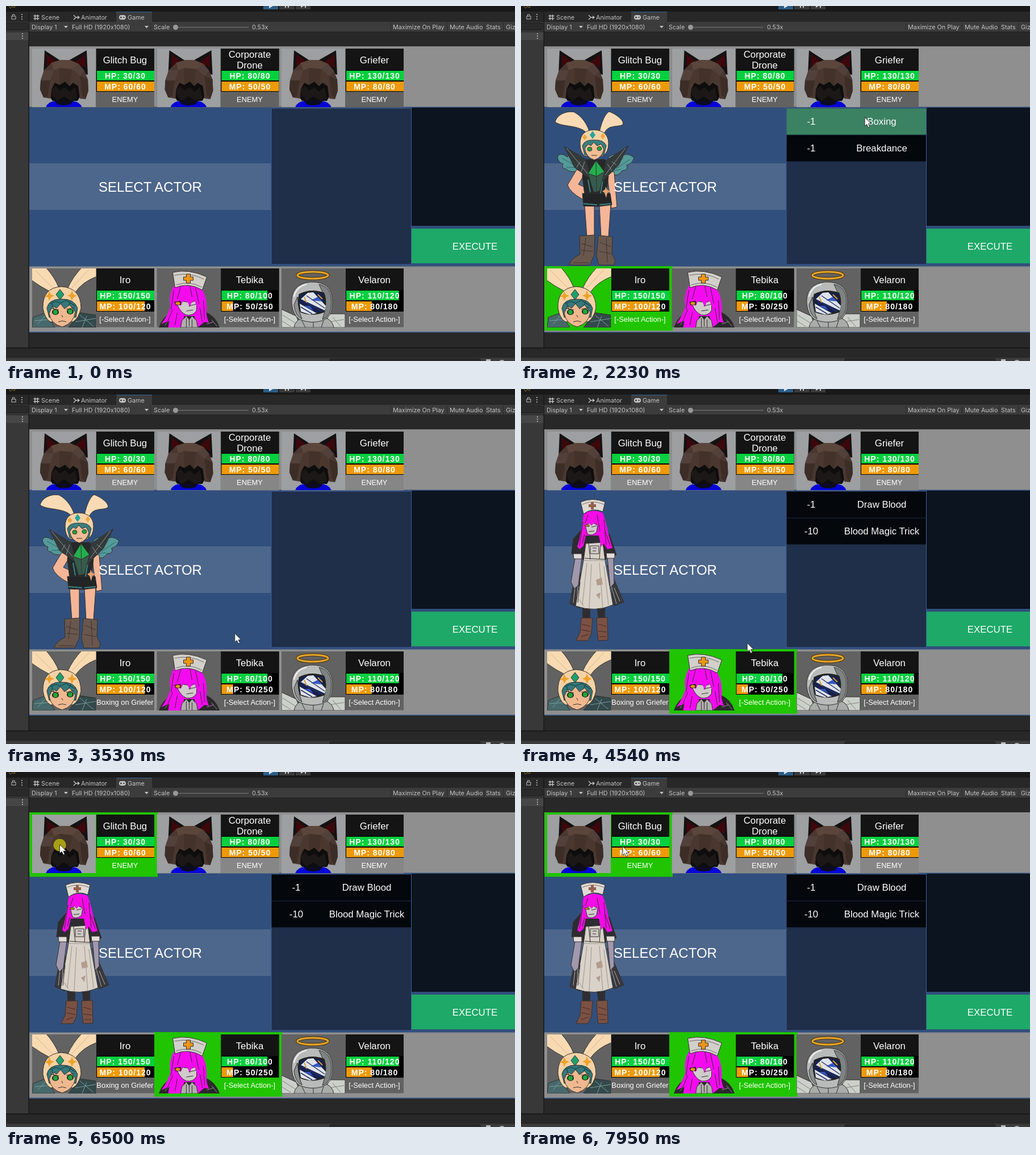
These frames come from a looping animation (896x625 px, 8000 ms). An HTML page:

```html
<!DOCTYPE html>
<html>
<head>
<meta charset="utf-8">
<style>
html, body { margin: 0; width: 100%; height: 100%; overflow: hidden; background: #282828; }
svg { display: block; }
text { font-family: "Liberation Sans", Arial, sans-serif; fill: #fff; text-anchor: middle; dominant-baseline: central; }
.ui { font-family: Inter, sans-serif; font-size: 10.8px; fill: #c2c2c2; text-anchor: start; }
.bar { font-weight: bold; font-size: 14px; letter-spacing: 1px; }
.ink { stroke: #33302f; stroke-width: 1; stroke-linejoin: round; }
</style>
</head>
<body>
<svg id="stage" width="896" height="625" viewBox="0 0 896 625"></svg>
<script>
const rect = (x, y, w, h, fill, more = '') => `<rect x="${x}" y="${y}" width="${w}" height="${h}" fill="${fill}" ${more}/>`;
const path = (d, fill, more = '') => `<path d="${d}" fill="${fill}" ${more}/>`;
const ink = (d, fill) => path(d, fill, 'class="ink"');
const line = (d, color = '#33302f', w = 1) => path(d, 'none', `stroke="${color}" stroke-width="${w}"`);
const oval = (x, y, rx, ry, fill, more = '') => `<ellipse cx="${x}" cy="${y}" rx="${rx}" ry="${ry}" fill="${fill}" ${more}/>`;
const text = (x, y, s, size, more = '') => `<text x="${x}" y="${y}" font-size="${size}" ${more}>${s}</text>`;
const ui = (x, y, s) => `<text class="ui" x="${x}" y="${y}">${s}</text>`;

// Portraits, drawn in a 112 x 104 box
const enemyFace = rect(0, 0, 112, 104, '#9d9fa1') +
  path('M20 46L22 3L48 20L40 40Z M66 20L96 3L98 46L74 40Z', '#141112') +
  path('M26 32L26 10L42 22Z M76 24L93 10L94 34Z', '#3d070b') +
  path('M24 104Q27 93 42 92H70Q84 93 88 104Z', '#0505d8') +
  path('M38 90H74L68 98Q55 102 44 98Z', '#0b0b25') +
  path('M28 44H88L88 78L80 92H36L28 80Z', '#0e0d0d') +
  path('M15 56L21 38L34 25L50 20H66L82 27L92 39L98 54L99 74L94 89L84 88L81 66L72 60L66 66L58 58L48 64L40 60L34 72L33 88L20 86L14 72Z', '#4a3830') +
  path('M34 25L50 20H66L82 27L70 36L48 34L38 38Z', '#5b463b') +
  path('M21 38L38 38L32 56L15 56Z M70 36L82 27L92 39L84 48Z', '#52403a') +
  path('M15 56L32 56L27 84L20 86L14 72Z M84 48L98 54L99 74L94 89L88 82Z', '#3c2d27') +
  path('M48 34L70 36L66 66L58 58L48 64Z', '#43322a') +
  path('M34 72L42 66L48 74L58 68L66 76L76 68L80 88L68 92L56 84L44 92L36 84Z', '#1b1817');

const bunnyFace =
  ink('M0 104L2 86L24 78L40 104Z', '#47696b') +
  ink('M64 104L84 78L112 82V104Z', '#33494c') +
  line('M4 92L30 90M10 98L24 82M84 82L108 102M76 94L112 88M88 104L96 84', '#7b9c9b') +
  ink('M34 42Q14 32 -2 20V-2H24Q40 16 47 34Z M62 36Q72 14 88 -2H114V14Q88 24 76 42Z', '#f8dab2') +
  line('M6 4L36 34M100 2L70 34', '#d9b48b') +
  ink('M19 70Q18 34 51 32Q86 34 86 70Q82 88 72 94L32 94Q22 88 19 70Z', '#f5d1a4') +
  ink('M26 70Q29 54 51 54Q74 53 80 70L77 86L30 86Z', '#35787a') +
  ink('M30 79L36 66L43 70L50 62L57 71L66 64L76 77Q74 96 53 103Q33 98 30 79Z', '#efb88f') +
  line('M30 62L42 58L50 61L60 56L76 66M34 60L38 72M68 58L64 66', '#1e4f54', 1.5) +
  oval(41, 77, 6, 5, '#12251d') + oval(41, 77, 4, 4, '#22a63a') +
  oval(67, 76, 6, 5, '#12251d') + oval(67, 76, 4, 4, '#22a63a') +
  line('M46 94Q53 91 60 94M33 70L47 73M60 72L74 69M52 82L54 86') +
  ink('M49 37L56 46L49 55L42 46Z', '#1ea06c') +
  path('M30 40L33 46L39 48L33 51L30 57L28 51L22 49L28 46Z M70 39L73 46L79 48L73 51L70 57L67 50L62 48L68 45Z', '#eda228');

const nurseFace =
  ink('M4 104Q10 84 30 76H84Q104 84 110 104Z', '#2a282b') +
  line('M14 100L28 84M96 90L106 102M88 98L100 94', '#8c898b') +
  path('M30 30Q20 48 24 66Q20 82 8 98L22 92L20 104H44L48 84H66L72 104L84 94L92 96Q86 84 88 72Q88 46 76 32Z', '#f50af0') +
  ink('M36 64L46 58L60 60L70 56L70 74Q64 84 52 82Q42 78 36 64Z', '#cfcbca') +
  path('M30 30Q54 24 76 34L80 64L70 66L64 52L58 68L50 50L42 66L32 60Z', '#f50af0') +
  path('M31 59L42 57L43 64L33 65Z', '#2b2320') + oval(37, 61.5, 4, 2.5, '#e49a13') +
  line('M56 66L70 63M52 75L64 73M30 38L25 72M42 32L36 54M58 30L62 50M68 34L74 62M82 56L84 90M28 72L18 96M36 78L32 100M76 70L80 94') +
  ink('M28 7Q56 0 88 15L80 38Q56 24 32 34Z', '#d3d0cb') +
  line('M31 12Q58 6 83 19M34 29Q58 21 79 33', '#6d6a67') +
  path('M52 10H59V15H64V21H59V26H52V21H47V15H52Z', '#ee9516', 'class="ink"') +
  ink('M42 104L44 92L52 84L57 90L62 84L70 92L72 104Z', '#b0adac') +
  line('M52 88V104M62 90V104M57 90V102');

const saintFace =
  line('M28 12A27 6 0 1 1 82 12A27 6 0 1 1 28 12', '#543d16', 5.5) +
  line('M28 12A27 6 0 1 1 82 12A27 6 0 1 1 28 12', '#e8a62a', 3) +
  ink('M0 72L26 84L34 104H0Z M112 80L84 80L74 104H112Z', '#ccd0ca') +
  line('M2 82L24 96M0 92L16 102M90 86L104 102M84 94L110 90', '#7f817d') +
  ink('M22 104Q24 90 40 86H74Q90 90 92 104Z', '#a9acaa') +
  line('M36 92L42 104M56 92V104M74 92L70 104') +
  ink('M18 62Q16 28 50 24Q90 22 90 60Q90 86 72 92Q52 98 32 90Q20 82 18 62Z', '#b9bbba') +
  ink('M66 28Q88 32 88 60Q88 84 72 90Q84 60 66 28Z', '#7e8283') +
  ink('M22 64Q24 84 36 89L32 78L28 50Z', '#8d9091') +
  path('M32 46Q52 36 74 44Q80 60 74 76Q54 84 34 76Q28 62 32 46Z', '#152150', 'stroke="#222" stroke-width="3"') +
  path('M34 54L46 43L56 42L78 66L76 74Z M32 62L62 79L50 81L34 76Z', '#dfe3ea') +
  path('M52 56L64 50L70 58Z M40 66L50 66L56 74Z', '#3457c4') +
  line('M36 56L72 76M44 48L76 70M34 68L54 80', '#263264', 1.5) +
  line('M40 50L44 60M64 46L72 54', '#d9a032', 2) +
  line('M22 50Q26 32 44 28', '#f4f4f4', 2);

// Full-body figures
const bunny =
  ink('M104 262Q84 256 82 266Q68 256 64 266Q66 276 74 278Q70 286 80 287Q84 294 104 291Z M154 266Q168 256 174 266Q186 256 199 267Q196 278 186 280Q190 290 178 290Q172 302 154 296Z', '#549a99') +
  line('M72 268L94 280M84 266L98 276M80 284L98 284M192 270L168 286M180 268L164 280M176 288L160 290', '#2f6567') +
  ink('M116 224C102 208 72 214 60 204C64 190 82 184 94 187C108 195 116 208 120 220Z M138 222C142 204 148 190 155 186C167 190 183 202 179 209C168 214 152 208 146 226Z', '#f8dab4') +
  ink('M112 350H129L129 407H116Z M138 350H158L154 407H141Z', '#f5b697') +
  ink('M103 405L130 403L129 438L121 456H85Q86 446 104 437Z M136 404L161 406L160 436L166 448L164 456H137L133 440Z', '#69574d') +
  line('M106 418L126 424M106 430L126 432M139 416L158 424M138 432L158 436M92 452H120M114 408L110 440M150 408L152 452', '#3e332e') +
  ink('M98 288L82 315Q86 328 108 340L122 336L123 324L101 314L113 294Z M151 292L164 292L169 354L159 356Z', '#f5b697') +
  ink('M112 270H148L154 300L150 332H112L108 300Z', '#26292a') +
  ink('M108 330H157L160 350L136 353L110 352Z', '#232426') +
  line('M110 348L134 350M138 350L158 348M118 306L122 328M144 306L140 330', '#3a8583', 2) +
  ink('M76 247L114 270L124 306L94 284Z M189 246L150 272L142 310L172 280Z', '#343a3a') +
  line('M80 250L118 296M104 274L98 284M112 274L106 292M184 250L148 298M160 274L168 280M152 278L160 290', '#8c9494') +
  ink('M132 272L147 292L133 300L118 295Z', '#23ae4d') +
  ink('M118 295L133 300L147 292L138 326L128 328Z', '#365c4c') +
  line('M132 272L133 326') +
  path('M149 318L152 324L158 326L152 329L150 338L147 329L143 326L148 323Z', '#e5a06c') +
  ink('M104 242Q104 219 128 218Q154 219 154 242Q154 258 144 264L112 264Q104 257 104 242Z', '#f6d2a7') +
  ink('M108 246Q112 235 128 236Q146 235 150 246L146 262H112Z', '#3a8080') +
  ink('M112 251L118 243L123 246L128 240L134 246L141 243L146 252Q143 267 129 271Q115 267 112 251Z', '#f1bc95') +
  oval(121, 252, 4, 3.5, '#1ba53a', 'class="ink"') + oval(138, 251, 4, 3.5, '#1ba53a', 'class="ink"') +
  line('M124 263H134') +
  path('M126 220L131 227L126 234L121 227Z', '#25a69a') +
  path('M112 226L117 231L112 236L108 231Z M144 224L148 229L144 235L140 229Z', '#eda940');

const nurse =
  ink('M98 330L92 345L86 378L104 386L112 320Z M152 310L166 340L181 375L164 382Z', '#39383c') +
  line('M95 350L92 376M100 345L98 380M164 350L174 374M158 344L168 378', '#b2aaa6') +
  ink('M108 384H122L121 408H109Z M134 386H148L147 408H137Z', '#302d31') +
  ink('M106 403H126L124 430L118 443H97L104 428Z M133 403L152 402L153 442L136 443L134 425Z', '#7b5144') +
  line('M108 414L122 418M107 424L122 427M106 436L118 432M136 414L150 418M136 426L151 428M138 436H150', '#432a24') +
  ink('M106 248L92 264L89 290L108 294L116 268Z M142 250L156 256L168 292L148 296Z', '#2e2c31') +
  ink('M95 298H107L101 345L94 352L88 340Z M152 296H163L164 342L157 350Z', '#a198ad') +
  ink('M92 290H107V299H93Z M150 289H165V298H151Z', '#e2ddd8') +
  ink('M112 258H146L150 300H108Z', '#2e2c31') +
  ink('M114 272L144 270L148 302L162 380Q130 394 96 382L110 302Z', '#d9d2c8') +
  line('M110 302H149M116 306L108 380M124 308L120 386M138 306L144 386M146 312L154 380M102 370L110 382', '#9f948a') +
  line('M119 272L122 300M140 272L138 300M112 298L148 300M104 340L100 376') +
  path('M132 336L142 332L144 344L134 346Z M132 362L140 358L138 370Z', '#b39d8f') +
  ink('M122 276H137V290H122Z', '#d0cac7') + line('M126 280H133M126 285H132') +
  path('M110 220Q126 210 144 218Q151 238 154 256L161 280L152 282L146 272L141 278L137 258H114L110 276L103 282L99 278Q106 256 110 220Z', '#f50ae8') +
  ink('M113 240L124 234L135 240L133 252Q125 260 117 255Z', '#cfc9ca') +
  path('M110 224Q127 212 143 222L142 246L136 244L131 232L124 241L119 234L111 248Z', '#f50ae8') +
  path('M113 239H120V242H113Z', '#df9518', 'class="ink"') +
  line('M124 243L133 241M119 251L129 250M109 234L103 276M118 222L113 236M134 222L139 250M146 230L150 274M148 250L157 276M112 256L108 272') +
  ink('M105 199Q126 190 148 199L144 216Q126 208 110 220Z', '#dfdad3') +
  line('M108 203Q126 195 146 203', '#77706b') +
  path('M123 199H128V203H132V208H128V212H123V208H119V203H123Z', '#95604d');

const cards = [
  { name: ['Glitch Bug'], hp: [30, 30], mp: [60, 60] },
  { name: ['Corporate', 'Drone'], hp: [80, 80], mp: [50, 50] },
  { name: ['Griefer'], hp: [130, 130], mp: [80, 80] },
  { name: ['Iro'], hp: [150, 150], mp: [100, 120], face: bunnyFace },
  { name: ['Tebika'], hp: [80, 100], mp: [50, 250], face: nurseFace },
  { name: ['Velaron'], hp: [110, 120], mp: [80, 180], face: saintFace }
];
cards.forEach((c, i) => {
  c.x = 46 + 219.5 * (i % 3);
  c.y = i < 3 ? 75 : 462;
});

function gauge(y, tag, [now, max], color) {
  return rect(114, y, 101 * now / max, 17, color) + text(164, y + 9, `${tag}: ${now}/${max}`, 14, 'class="bar"');
}

function cardMarkup(c, i) {
  const lines = c.name.map((s, k) => text(163.5, c.name.length > 1 ? 10.5 + 19 * k : 20, s, 16.8)).join('');
  return `<g transform="translate(${c.x} ${c.y})">
    ${rect(-4.5, -4, 225.5, 113.5, '#20c400', `id="glow${i}"`)}
    ${rect(0, 0, 215, 103.5, '#626262', `id="back${i}"`)}
    <svg width="112.5" height="${c.face ? 104 : 103}">${c.face || enemyFace}</svg>
    ${rect(113, 0, 102, 76, '#000')}${rect(113, 0, 102, 38, '#141414')}
    ${lines}${gauge(39, 'HP', c.hp, '#06d03f')}${gauge(58, 'MP', c.mp, '#ee9a08')}
    ${text(163.5, 89.5, c.face ? '[-Select Action-]' : 'ENEMY', 12.9, `id="label${i}"`)}</g>`;
}

const editor =
  rect(0, 0, 896, 10, '#191919') + path('M5 0L8 4L11 1L15 3L16 0', 'none', 'stroke="#8b762d"') +
  rect(453, 0, 26, 6, '#2c5d87') + rect(481, 0, 27, 6, '#3a3a3a') + rect(510, 0, 26, 6, '#3a3a3a') +
  path('M463 0H470L463 4Z', '#d8e6f2') + path('M491 0h2v3h-2zM496 0h2v3h-2zM519 0h5l-5 3zM526 0h2v3h-2z', '#c8c8c8') +
  rect(0, 10, 896, 18, '#282828') + rect(194, 11, 63, 17, '#3c3c3c') + rect(194, 10, 63, 1, '#35618f') +
  rect(0, 28, 896, 18, '#3c3c3c') + rect(0, 45, 896, 1, '#232323') +
  rect(0, 46, 40, 555, '#383838') + rect(0, 46, 40, 14, '#464646') + rect(-4, 29.5, 42, 13, '#2a2a2a', 'rx="2" stroke="#1d1d1d"') +
  rect(39.5, 10, 1.5, 591, '#191919') + rect(0, 601, 896, 1.5, '#151515') +
  rect(0, 619.5, 896, 6, '#3c3c3c') + rect(570, 621, 265, 8, '#292929', 'rx="2" stroke="#1c1c1c"') +
  rect(845, 622, 8, 3, '#bbb') + oval(873, 625, 4, 2, '#aaa') +
  rect(10, 18, 7, 5, 'none', 'stroke="#bbb"') + line('M11.5 18V15H15V17', '#bbb') +
  [[28, 19], [29, 53]].map(([x, y]) => [-4, 0, 4].map(d => oval(x, y + d, 1, 1, '#c4c4c4')).join('')).join('') +
  line('M51 15V25M55.5 15V25M48.5 17.5H58.5M48.5 22H58.5', '#c4c4c4', 1.3) +
  line('M119 16L123 20L119 24M123 20H129M126 17.5L129 20L126 22.5', '#c4c4c4', 1.3) +
  rect(199, 16, 12, 8, '#c4c4c4', 'rx="4"') + oval(202.5, 20, 1.5, 1.5, '#3c3c3c') + oval(207.5, 20, 1.2, 1.2, '#3c3c3c') +
  ui(62, 20, 'Scene') + ui(132, 20, 'Animator') + ui(214, 20, 'Game') +
  ui(45, 37, 'Display 1') + ui(116, 37, 'Full HD (1920x1080)') + ui(260, 37, 'Scale') + ui(433, 37, '0.53x') +
  ui(681, 37, 'Maximize On Play') + ui(781, 37, 'Mute Audio') + ui(845, 37, 'Stats') + ui(880, 37, 'Gizmos') +
  path('M102 35h7l-3.5 4zM244 35h7l-3.5 4z', '#c4c4c4') +
  line('M112.5 29V45M254.5 29V45M677.5 29V45M776.5 29V45M841.5 29V45M875.5 29V45', '#2b2b2b') +
  line('M294 37.5H427', '#686868', 1.5) + oval(298.5, 37.5, 4.5, 4.5, '#999');

const game =
  rect(41, 71, 855, 504, '#8f8f8f') + rect(41, 177.5, 855, 281, '#314f7c') + rect(41, 573.5, 855, 1.5, '#34558a') +
  rect(41, 277, 425.5, 82, '#4d678c') +
  rect(467, 180, 246.5, 275, '#1f2e49', 'stroke="#3b5f98"') +
  rect(714, 179, 182, 208, '#0c141f') + rect(714, 392, 182, 61, '#1ea968') +
  text(825.5, 423, 'EXECUTE', 16.8);

const row = k => `<g transform="translate(467 ${180.5 + 47 * k})">${rect(0.5, 0, 245.5, 46, '#04070c', `id="row${k}"`)}
  ${text(44, 23, '', 16.8, `id="cost${k}"`)}${text(168, 23, '', 16.8, `id="skill${k}"`)}</g>`;

const stage = document.getElementById('stage');
stage.innerHTML = editor + game +
  `<g id="actor0">${bunny}</g><g id="actor1">${nurse}</g>` + text(254, 318, 'SELECT ACTOR', 24) +
  `<g id="list">${row(0)}${row(1)}</g>` + cards.map(cardMarkup).join('') +
  `<g id="cursor">${oval(0, 1, 11, 11, '#cfc80a', 'id="press" opacity=".72"')}` +
  path('M0 0V15.5L3.6 12.3L6.2 18L8.8 16.8L6.3 11.4H11.2Z', '#fff', 'stroke="#222" stroke-width=".9"') + '</g>';

const el = id => document.getElementById(id);
const show = (id, on) => el(id).style.display = on ? '' : 'none';

// Pointer stops: time, x, y
const stops = [
  [390, 146, 640], [600, 146, 580], [900, 148, 515], [1060, 149, 496], [1480, 149, 496],
  [1560, 215, 445], [1760, 470, 275], [1900, 595, 205], [1960, 605, 196], [2230, 605, 196],
  [2350, 615, 180], [2550, 660, 130], [2700, 675, 104], [3180, 675, 104],
  [3300, 620, 200], [3530, 403, 430], [3700, 374, 476], [3800, 372, 480], [4470, 372, 480],
  [4600, 420, 420], [4800, 543, 306], [4950, 590, 262], [5080, 593, 257], [5960, 593, 257],
  [6100, 480, 230], [6300, 200, 150], [6430, 95, 128], [6770, 93, 127],
  [6880, 200, 170], [6980, 375, 250], [7080, 483, 405], [7160, 520, 480], [7280, 500, 330],
  [7350, 485, 184], [7430, 340, 120], [7530, 205, 98], [7600, 205, 98], [7800, 196, 115], [7950, 179, 131]
];
const presses = [[1060, 1130], [2780, 2850], [4400, 4470], [6500, 6640]];
const skills = [[['-1', 'Boxing'], ['-1', 'Breakdance']], [['-1', 'Draw Blood'], ['-10', 'Blood Magic Trick']]];

function pointer(t) {
  const i = stops.findIndex(s => s[0] > t);
  if (i === 0) return [-99, -99];
  if (i < 0) return stops[stops.length - 1].slice(1);
  const [t0, x0, y0] = stops[i - 1], [t1, x1, y1] = stops[i];
  const k = (t - t0) / (t1 - t0);
  return [x0 + (x1 - x0) * k, y0 + (y1 - y0) * k];
}

function draw(t) {
  const [x, y] = pointer(t);
  const actor = t < 1130 ? -1 : t < 4470 ? 0 : 1;
  const listed = actor === 1 || actor === 0 && t < 3200;
  const chosen = t >= 1060 && t < 3200 ? 3 : t >= 4400 ? 4 : -1;

  el('cursor').setAttribute('transform', `translate(${x} ${y})`);
  show('press', presses.some(([a, b]) => t >= a && t < b));
  show('actor0', actor === 0);
  show('actor1', actor === 1);
  show('list', listed);
  if (listed) skills[actor].forEach(([cost, skill], k) => {
    const top = 180 + 47 * k;
    const over = x > 467 && x < 713 && y >= top && y < top + 47;
    el('row' + k).setAttribute('fill', over ? '#3b8262' : '#04070c');
    el('cost' + k).textContent = cost;
    el('skill' + k).textContent = skill;
  });
  cards.forEach((c, i) => {
    const over = x > c.x - 4 && x < c.x + 216 && y > c.y - 4 && y < c.y + 109;
    const lit = over || i === chosen;
    show('glow' + i, lit);
    show('back' + i, !lit);
    if (i < 3) el('back' + i).setAttribute('fill', t < 2850 ? '#626262' : '#868686');
  });
  el('label3').textContent = t < 2850 ? '[-Select Action-]' : 'Boxing on Griefer';
}

function tick() {
  draw(performance.now() % 8000);
  requestAnimationFrame(tick);
}
tick();
</script>
</body>
</html>
```
